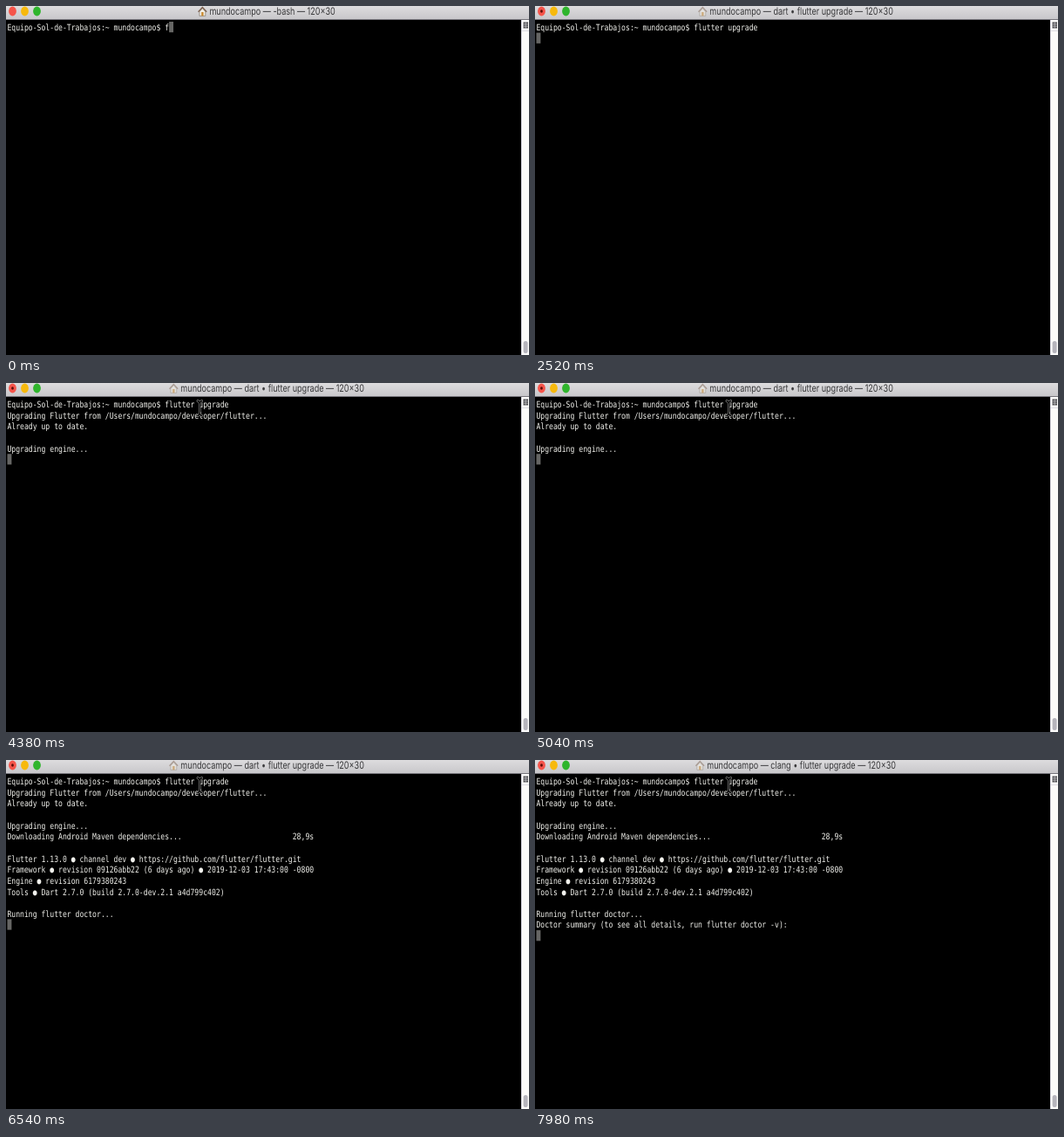
Write an HTML page that moves like this. It is 600x400 px and loops after 8 s.

```html
<!DOCTYPE html>
<html lang="en">
<head>
<meta charset="utf-8">
<title>Terminal</title>
<style>
  html, body { margin: 0; width: 100%; height: 100%; overflow: hidden; background: #000; }
  svg { display: block; width: 100vw; height: 100vh; }
  text { white-space: pre; text-rendering: geometricPrecision; }
  #title { font: 11.7px Inter, Roboto, sans-serif; fill: #3a3a3c; text-anchor: middle; }
  #lines { font: 10px "DejaVu Sans Mono", "Noto Sans Mono", monospace; fill: #f1f1ec; }
</style>
</head>
<body>
<svg viewBox="0 0 600 400">
  <defs>
    <linearGradient id="bar" x2="0" y2="1">
      <stop offset="0" stop-color="#dddcde"/>
      <stop offset="1" stop-color="#c8c7ca"/>
    </linearGradient>
    <path id="ibeam" d="M219.8 20.5Q222.3 21 222.3 24V34Q222.3 37 219.8 37.5M224.8 20.5Q222.3 21 222.3 24V34Q222.3 37 224.8 37.5"/>
  </defs>
  <rect width="600" height="400"/>
  <rect width="600" height="15" fill="url(#bar)"/>
  <rect y="15" width="600" height="1" fill="#77767c"/>

  <ellipse cx="7.5" cy="6" rx="4.4" ry="5.4" fill="#f5544a"/>
  <ellipse cx="21.5" cy="6" rx="4.4" ry="5.4" fill="#f7b90c"/>
  <ellipse cx="35.5" cy="6" rx="4.4" ry="5.4" fill="#2fb52c"/>
  <ellipse id="dot" cx="7.5" cy="6" rx="1.4" ry="1.8" fill="#5c0d08"/>

  <g id="house">
    <path d="M-3.4 6.5V11.4H3.4V6.5L0 2.6Z" fill="#f4f0e6" stroke="#7d766c" stroke-width=".7"/>
    <path d="M-4.8 6.8L0 1.6L4.8 6.8" fill="none" stroke="#7d6250" stroke-width="1.4"/>
    <rect x="-1.2" y="7" width="2.4" height="4.4" fill="#c9892f"/>
  </g>
  <g transform="translate(305.6 0) scale(.775 1)"><text id="title" y="10.3"></text></g>

  <rect x="591" y="16" width="9" height="384" fill="#fbfbfa"/>
  <rect x="591" y="16" width=".8" height="384" fill="#dcdbe6"/>
  <rect x="591" y="28" width="9" height=".8" fill="#d6d5de"/>
  <rect x="593.5" y="18.5" width="5.5" height="7" fill="#4c4c50"/>
  <path d="M593.5 20.8H599M593.5 23.2H599M596.2 18.5V25.5" stroke="#dcdce0" stroke-width=".6"/>
  <rect x="593.6" y="384" width="5" height="14" rx="2.5" fill="#b5b4bc"/>

  <rect id="caret" width="4.9" height="12.2" fill="#666664"/>
  <!-- the terminal is condensed horizontally as a whole -->
  <g id="lines" transform="translate(1.4 28) scale(.8115 1)"></g>

  <g id="beam" fill="none" stroke-linecap="round">
    <use href="#ibeam" stroke="#a8a8a6" stroke-width="2.4"/>
    <use href="#ibeam" stroke="#000" stroke-width="1.3"/>
  </g>
</svg>
<script>
const LOOP = 8000, COL = 4.885, ROW = 12.65;
const USER = 'mundocampo';
const PROMPT = `Equipo-Sol-de-Trabajos:~ ${USER}$ `;
const COMMAND = 'flutter upgrade';
const ENTER = 1380;

// [time, line]
const output = [
  [2700, `Upgrading Flutter from /Users/${USER}/developer/flutter...`],
  [3570, 'Already up to date.'],
  [4350, ''],
  [4350, 'Upgrading engine...'],
  [6150, 'Downloading Android Maven dependencies...'.padEnd(67) + '28,9s'],
  [6270, ''],
  [6270, 'Flutter 1.13.0 ● channel dev ● https://github.com/flutter/flutter.git'],
  [6270, 'Framework ● revision 09126abb22 (6 days ago) ● 2019-12-03 17:43:00 -0800'],
  [6270, 'Engine ● revision 6179380243'],
  [6270, 'Tools ● Dart 2.7.0 (build 2.7.0-dev.2.1 a4d799c402)'],
  [6360, ''],
  [6360, 'Running flutter doctor...'],
  [7080, 'Doctor summary (to see all details, run flutter doctor -v):']
];

// [time, running process]
const jobs = [
  [0, '-bash'], [ENTER, 'bash'], [2520, 'dart'], [2850, 'git-remote-https'],
  [3600, 'dart'], [4860, 'bash'], [5040, 'dart'], [7710, 'xcodebuild'], [7950, 'clang']
];

const $ = id => document.getElementById(id);
const set = (el, attrs) => { for (const k in attrs) el.setAttribute(k, attrs[k]); };
const setText = (el, s) => { if (el.textContent !== s) el.textContent = s; };

const rows = Array.from({ length: output.length + 1 }, (_, i) => {
  const row = document.createElementNS('http://www.w3.org/2000/svg', 'text');
  set(row, { y: i * ROW });
  return $('lines').appendChild(row);
});

// five letters, a pause, then the rest
function typed(t) {
  if (t < 600) return 1 + Math.min(4, Math.floor((t + 90) / 120));
  return Math.min(COMMAND.length, 6 + Math.floor((t - 600) / 70));
}

function draw(t) {
  const busy = t >= ENTER;
  const input = PROMPT + COMMAND.slice(0, typed(t));
  const shown = output.filter(([at]) => t >= at);
  setText(rows[0], input);
  output.forEach(([at, line], i) => setText(rows[i + 1], t >= at ? line : ''));

  const caretRow = busy ? shown.length + 1 : 0;
  const caretCol = busy ? 0 : input.length;
  set($('caret'), { x: 1.5 + caretCol * COL, y: 18 + caretRow * ROW });

  const job = jobs.filter(([at]) => t >= at).pop()[1];
  setText($('title'), `${USER} — ${job}${busy ? ' • ' + COMMAND : ''} — 120×30`);
  const width = $('title').getComputedTextLength() * .775;
  set($('house'), {
    transform: `translate(${305.6 - width / 2 - 8} 0)`,
    opacity: busy ? .5 : 1
  });
  set($('dot'), { opacity: busy ? 1 : 0 });
  set($('beam'), { opacity: t >= 3870 ? 1 : 0 });
}

function tick() {
  draw(performance.now() % LOOP);
  requestAnimationFrame(tick);
}
tick();
</script>
</body>
</html>
```
